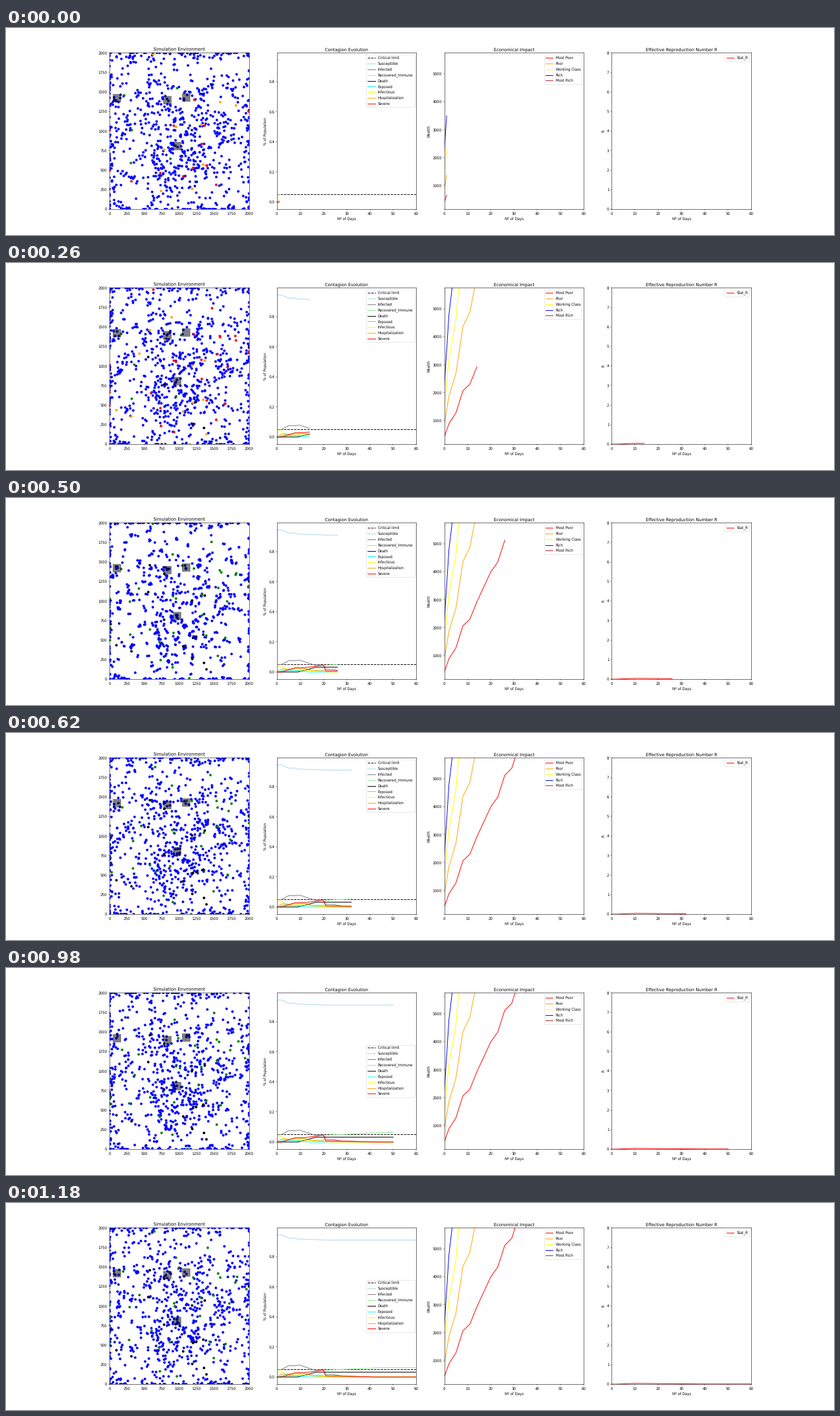
Recreate the animation shown at these times as a matplotlib script. Size 1280 px wide and 320 px high, loop 1.2 s.

```python
import numpy as np
import matplotlib.pyplot as plt
from matplotlib.animation import FuncAnimation

DAYS = 60
SIDE = 2000
PEOPLE, SICK, DEATHS = 860, 50, 17
CURE_DAY, LATE_CURE = 20, 44
LEGEND = dict(loc="upper right", labelspacing=0.545)
plt.rcParams.update({"font.family": "DejaVu Sans", "text.hinting": "none",
                     "axes.linewidth": 1.0, "lines.linewidth": 1.75})

fig, axes = plt.subplots(1, 4, figsize=(32, 8), dpi=40)
fig.subplots_adjust(left=0.125, right=0.9, bottom=0.125, top=0.88, wspace=0.2)
town, spread, money, repro = axes
days = np.arange(DAYS + 1)


def setup(ax, title, ylabel, ylim):
    ax.set_title(title)
    ax.set_xlabel("Nº of Days")
    ax.set_ylabel(ylabel)
    ax.set_xlim(0, DAYS)
    ax.set_ylim(*ylim)


def add_series(ax, series):
    return [(ax.plot([], [], color=color, label=label)[0], values)
            for label, color, values in series]


def ramps(start, *steps):
    """A level changed by linear steps (first day, last day, change)."""
    return start + sum(change * np.clip((days - a) / (b - a), 0, 1)
                       for a, b, change in steps)


# --- people: the sick first, then the healthy ---
rng = np.random.default_rng(19)
clinics = np.array([(102, 1424), (830, 1403), (1094, 1432), (960, 815)])
sick = rng.normal((1000, 850), (580, 500), (SICK, 2))
houses = rng.normal(SIDE / 2, 700, (600, 2))
healthy = houses[rng.integers(0, len(houses), PEOPLE)]
visitors = np.repeat(clinics, 4, axis=0)
homes = np.clip(np.vstack([sick, healthy, visitors]), 0, SIDE)

onset = rng.uniform(-16, 14, SICK)
cure = np.where(rng.random(SICK) < 0.08, LATE_CURE, CURE_DAY)
death = np.full(SICK, np.inf)
death[:DEATHS] = rng.uniform(9, 19, DEATHS)


def crowd(day):
    """Positions and colours of everybody on one day."""
    colors = np.full(len(homes), "blue", dtype="<U6")
    state = np.where(day < onset, "blue", np.where(day < onset + 4, "orange", "red"))
    state[day > cure] = "green"
    state[(day > death - 5)] = "orange"
    state[day >= death] = "black"
    state[DEATHS:DEATHS + 5] = "green"
    colors[:SICK] = state

    rng = np.random.default_rng(100 + day)
    reach = 10 if day % 7 == 5 else 40
    free = np.isin(colors, ["blue", "green"])[:, None]
    pts = homes + free * rng.normal(0, reach, homes.shape)
    # healthy people are drawn below the others
    return np.clip(pts, 0, SIDE)[::-1], colors[::-1]


town.set_title("Simulation Environment")
town.set_xlim(0, SIDE)
town.set_ylim(0, SIDE)
start, tints = crowd(1)
dots = town.scatter(start[:, 0], start[:, 1], c=tints)
town.plot(*clinics.T, "s", color="black", alpha=0.5, markersize=21.5)

# --- contagion ---
setup(spread, "Contagion Evolution", "% of Population", (-0.0471, 0.9896))
spread.plot([0, DAYS], [0.05, 0.05], "--", color="black", label="Critical limit")
lines = add_series(spread, [
    ("Susceptible", "lightblue",
     ramps(.9425, (2, 5, -.021), (8, 9, -.007), (10, 22, -.006))),
    ("Infected", "gray",
     ramps(.05, (2, 5, .025), (8, 9, .003), (10, 16, -.031),
           (20, 21, -.03), (24, 28, -.011), (28, 42, -.006))),
    ("Recovered_Immune", "lightgreen",
     ramps(0, (0, 10, .012), (20, 21, .033), (21, 44, .017))),
    ("Death", "black", ramps(0, (9, 17, .0325))),
    ("Exposed", "cyan", ramps(0, (0, 4, .015), (4, 14, -.015))),
    ("Infectious", "yellow", ramps(.05, (0, 4, -.032), (8, 22, -.018))),
    ("Hospitalization", "orange",
     ramps(0, (0, 2, .02), (6, 10, .004), (12, 15, -.014), (15, 28, -.01))),
    ("Severe", "red",
     ramps(0, (2, 8, .029), (12, 20, .017), (20, 21, -.038), (26, 42, -.008))),
])
key = spread.legend(**LEGEND)

# --- economy: every class follows the same growth on its own scale ---
setup(money, "Economical Impact", "Wealth", (148, 5757))
growth = np.interp(days, [0, 2, 5, 8, 11, 14, 20, 23, 26, 29, 31, DAYS],
                   [403, 880, 1270, 2060, 2300, 2920, 4000, 4350, 5130, 5380,
                    5900, 12000])
lines += add_series(money, [
    ("Most Poor", "red", growth),
    ("Poor", "orange", growth * 2.12),
    ("Working Class", "yellow", growth * 3.64),
    ("Rich", "blue", growth * 5.45),
    ("Most Rich", "brown", growth * 13.65),
])
money.legend(**LEGEND)

# --- reproduction number ---
setup(repro, "Effective Reproduction Number R", "R", (0, 8))
lines += add_series(repro, [
    ("Stat_R", "red", ramps(0, (2, 10, .04), (10, 40, -.033)))])
repro.legend(**LEGEND)


def draw(frame):
    day = frame + 1
    pts, colors = crowd(day)
    dots.set_offsets(pts)
    dots.set_color(colors)
    for line, values in lines:
        line.set_data(days[:day + 1], values[:day + 1])
    # the key steps aside once the top line reaches it
    key.set_loc("upper right" if day < 39 else "right")
    return [dots, key] + [line for line, _ in lines]


anim = FuncAnimation(fig, draw, frames=DAYS, interval=20, repeat=True,
                     repeat_delay=0, blit=False)
plt.show()
```
